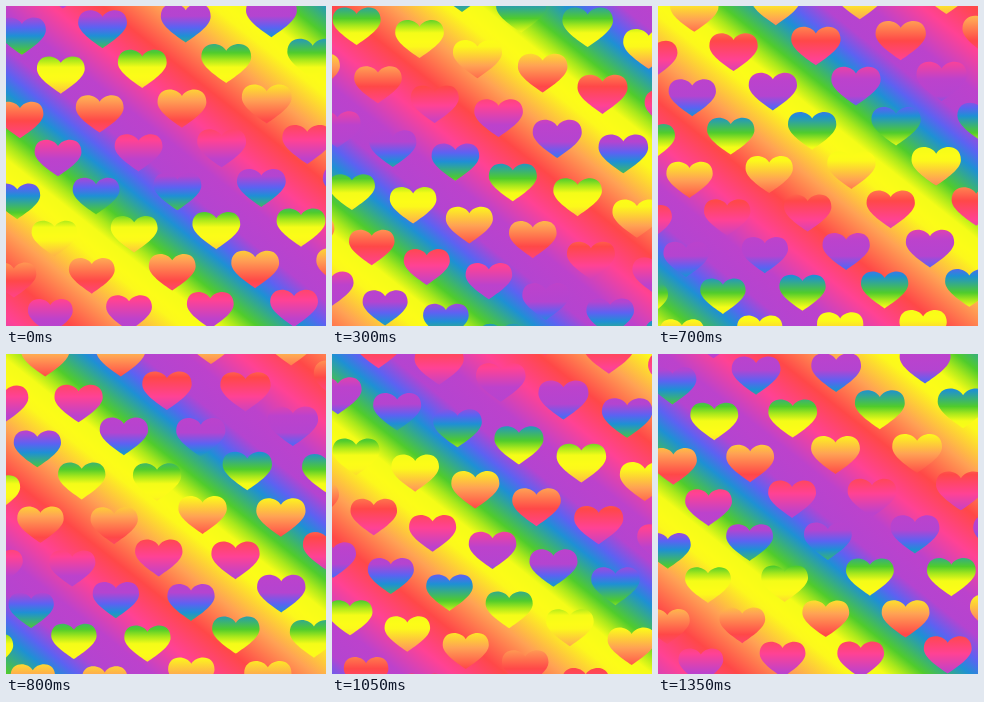
Recreate the animation shown at these times as an HTML page with a canvas. Size 320x320 px, loop 1.4 s.

```html
<!DOCTYPE html>
<html lang="en">
<head>
<meta charset="utf-8">
<title>Rainbow hearts</title>
<style>
  html, body { margin: 0; width: 100%; height: 100%; overflow: hidden; }
  canvas { display: block; width: 100vw; height: 100vh; }
</style>
</head>
<body>
<canvas id="stage" width="320" height="320"></canvas>
<script>
const ctx = document.getElementById('stage').getContext('2d');
const LOOP = 1400, STEPS = 28;

const RAINBOW = [
  [0, '#fcfc18'], [0.03, '#fcf81c'], [0.15, '#ffa254'], [0.28, '#ff4848'],
  [0.4, '#ff4294'], [0.52, '#bc42cc'], [0.625, '#b444d0'], [0.695, '#5c62f2'],
  [0.75, '#1e90d4'], [0.855, '#50cc2c'], [0.9, '#a8e81c'], [0.945, '#f4fc18']
];
const REPEATS = 4;

// Vertical travel of each rainbow over one period, and where yellow starts
const BACK = { period: 345, yellow: 172, slope: 0.79 };
const FILL = { period: 160, yellow: 70 };

// Hearts sit on diagonals x + y = const and slide along them
const LINE_GAP = 78, FIRST_LINE = 44, HEART_GAP = 87, SHIFT = -13;
// The field grows slightly towards the upper right corner
const GROW = 0.00024;

const heart = new Path2D(
  'M0-11C-5-20-24-21-24-5C-24 4-10 13 0 20C10 13 24 4 24-5C24-21 5-20 0-11Z');

// Repeated rainbow along y - slope * x, beginning at the value `start`
function rainbow(start, period, slope = 0) {
  const n = 1 + slope * slope, end = start + period * REPEATS;
  const g = ctx.createLinearGradient(
    -slope * start / n, start / n, -slope * end / n, end / n);
  for (let r = 0; r < REPEATS; r++) {
    for (const [at, color] of RAINBOW) g.addColorStop((r + at) / REPEATS, color);
  }
  g.addColorStop(1, RAINBOW[0][1]);
  return g;
}

function heartField(t) {
  const field = new Path2D();
  for (let line = -1; line <= 8; line++) {
    const dir = line % 2 ? -1 : 1;
    for (let i = -5; i <= 5; i++) {
      const along = SHIFT + HEART_GAP * (i + dir * t);
      const size = 1 + GROW * along;
      const diff = along * (1 + size) / 2;
      const sum = 320 + (FIRST_LINE + line * LINE_GAP - 320) * size;
      field.addPath(heart,
        new DOMMatrix().translate((sum + diff) / 2, (sum - diff) / 2).scale(size));
    }
  }
  return field;
}

function draw(t) {
  ctx.fillStyle = rainbow(BACK.yellow + BACK.period * (t - 3), BACK.period, BACK.slope);
  ctx.fillRect(0, 0, 320, 320);
  ctx.fillStyle = rainbow(FILL.yellow - FILL.period * (t + 1), FILL.period);
  ctx.fill(heartField(t));
}

const begin = performance.now();
function tick() {
  const ms = Math.max(0, performance.now() - begin) % LOOP;
  draw(Math.floor(ms / LOOP * STEPS) / STEPS);
  requestAnimationFrame(tick);
}
tick();
</script>
</body>
</html>
```
